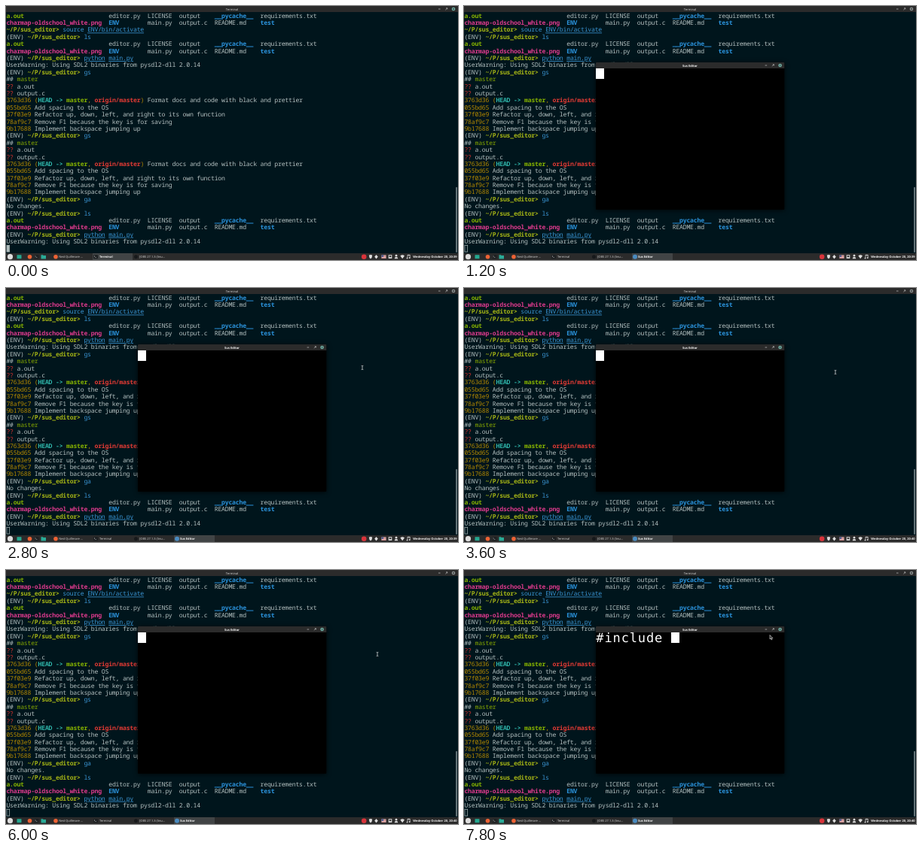
Write an HTML page that moves like this. It is 600 by 338 pixels and loops after 8000 ms.

```html
<!DOCTYPE html>
<html lang="en">
<head>
<meta charset="utf-8">
<title>Terminal and editor</title>
<style>
  html, body { margin: 0; width: 100%; height: 100%; overflow: hidden; background: #00151c; }
  svg { display: block; width: 100vw; height: 100vh; }
  text { white-space: pre; text-rendering: geometricPrecision; }
  #terminal { font: 8.2px "Noto Sans Mono", "DejaVu Sans Mono", monospace; letter-spacing: -.23px; fill: #b4c0c0; }
  .ui { font: 4px "Noto Sans", "Open Sans", sans-serif; fill: #d4d4d4; }
  .strong { font-weight: 600; fill: #f2f2f2; }
  .G, .B, .M, .P, .C, .R { font-weight: 700; }
  .G { fill: #86b300; }
  .B { fill: #2b93dc; }
  .M { fill: #dc3a8c; }
  .P { fill: #a5b416; }
  .C { fill: #2fb5aa; }
  .R { fill: #e03a34; }
  .g { fill: #86a800; }
  .r { fill: #dc322f; }
  .y { fill: #b58900; }
  .b { fill: #3a95d4; }
  .u { fill: #3a95d4; text-decoration: underline; }
  #typed { font: 17px "DejaVu Sans Mono", monospace; letter-spacing: .88px; fill: #fff; }
  #window { filter: drop-shadow(0 1px 3px #000b); }
</style>
</head>
<body>
<svg viewBox="0 0 600 338" preserveAspectRatio="none">
  <defs>
    <g id="controls" fill="none" stroke="#c4c4c4" stroke-width=".7">
      <path d="M-20 0h2.6M-10.6 1.2l2.4-2.4M-9.8-1.2h1.6v1.6"/>
      <circle r="2.3" fill="currentColor" stroke="none"/>
      <path d="M-.9-.9l1.8 1.8M.9-.9l-1.8 1.8" stroke="#262626"/>
    </g>
    <g id="shell">
      <rect x="-3" y="-2.5" width="6" height="5" rx=".6" fill="#1d2022"/>
      <path d="M-2-1.3l1 .8-1 .8M-.6.8h1.5" fill="none" stroke="#ddd" stroke-width=".5"/>
    </g>
  </defs>

  <rect width="600" height="338" fill="#00151c"/>
  <g id="terminal"></g>
  <rect id="block" x="1" y="318.3" width="3.7" height="8.8" stroke="#aebbbb" stroke-width=".7"/>
  <rect x="597.2" y="241" width="1.7" height="87" rx=".8" fill="#77858a"/>

  <rect width="600" height="8" fill="#2b2b2b"/>
  <text class="ui" x="300" y="5.5" text-anchor="middle">Terminal</text>
  <use id="mainControls" href="#controls" x="594" y="4"/>

  <g id="window">
    <rect x="175" y="75" width="250.3" height="196" rx="1" fill="#000"/>
    <path d="M175 83v-7q0-1 1-1h248.300q1 0 1 1v7z" fill="#2b2b2b"/>
    <rect id="hover" x="407" y="76.300" width="5.500" height="5.500" rx="1" fill="#555"/>
    <text class="ui strong" x="300" y="80.700" text-anchor="middle">Sus Editor</text>
    <use href="#controls" x="419.600" y="79" color="#72b5aa"/>
    <text id="typed" x="175.300" y="96"></text>
    <rect id="caret" y="83" width="11" height="14" fill="#fff"/>
  </g>

  <g class="ui">
    <rect y="329" width="600" height="9" fill="#2b2b2b"/>
    <rect id="activeTask" y="329" height="9" fill="#414445"/>
    <circle cx="5.500" cy="333.700" r="3.600" fill="#dedede"/>
    <rect x="14.500" y="331.200" width="6" height="5" rx=".5" fill="#25a891"/>
    <circle cx="31.500" cy="333.700" r="2.800" fill="#ee6335"/>
    <use href="#shell" x="40.500" y="333.700"/>
    <path d="M46.500 331.200h2.400l.7.800h3.400v4.500h-6.500z" fill="#2aab97"/>
    <circle cx="66" cy="333.700" r="2.800" fill="#ee6335"/>
    <text x="70.300" y="335.300">Ned Quillmore ...</text>
    <use href="#shell" x="119" y="333.700"/>
    <text id="shellTask" x="124" y="335.300">Terminal</text>
    <circle cx="172.500" cy="333.700" r="2.500" fill="#17191b"/>
    <text x="177" y="335.300">[OBS 27.1.3 (linu...</text>
    <g id="editorTask">
      <circle cx="227" cy="333.700" r="3" fill="#4a8bc0"/>
      <text class="strong" x="231" y="335.300">Sus Editor</text>
    </g>
    <circle cx="475.200" cy="333.700" r="3.300" fill="#d8343b"/>
    <g fill="#dedede">
      <path d="M481.800 331.600q2.200-.2 2.200-.8 0 .6 2.200.8 0 3.700-2.200 5-2.200-1.300-2.200-5z"/>
      <path d="M491.500 331l2.300 2.700-2.300 2.700-2.300-2.700z"/>
      <rect x="498.500" y="331.500" width="6" height="4.500"/>
      <path d="M498.500 332.300h6M498.500 333.800h6M498.500 335.300h6" stroke="#d25353" stroke-width=".7"/>
      <rect x="498.500" y="331.500" width="2.600" height="2.300" fill="#42538e"/>
      <path d="M507.700 331.300h4.600v4.800h-4.600zM508.700 332.300v2h2.600v-2z" fill-rule="evenodd"/>
      <circle cx="518" cy="332.200" r="1.400"/>
      <path d="M515.700 336.300q0-2.300 2.300-2.300t2.300 2.300z"/>
      <path d="M523.400 332.500q2.800-2.300 5.600 0l-2.800 3.800z"/>
      <path d="M533 335.500v-4.200h3.200v3.800M533 331.800h3.200" fill="none" stroke="#dedede" stroke-width=".7"/>
      <circle cx="532.500" cy="335.600" r=".9"/>
      <circle cx="535.700" cy="335.200" r=".9"/>
    </g>
    <text id="clock" class="strong" x="598.500" y="335.300" text-anchor="end"></text>
  </g>

  <g id="pointer">
    <path id="arrow" d="M0 0v5.500l1.300-1.100.9 2 .9-.4-.9-1.900h1.700z" fill="#222" stroke="#fff" stroke-width=".55"/>
    <path id="beam" d="M-1.300-2.600q1 0 1.300.5.300-.5 1.300-.5M0-2.100v4.200M-1.300 2.600q1 0 1.300-.5.300.5 1.300.5" fill="none" stroke="#e4e4e4" stroke-width=".75"/>
  </g>
</svg>
<script>
const $ = id => document.getElementById(id);
const LOOP = 8000, STEP = 200;

// Markup: {class:text}
const listing = [
  "{G:a.out}" + " ".repeat(24) + "editor.py  LICENSE  output    {B:__pycache__}  requirements.txt",
  "{M:charmap-oldschool_white.png}  {B:ENV}        main.py  output.c  README.md    {B:test}"
];
const prompt = command => `(ENV) {P:~/P/sus_editor>} ${command}`;
const run = [prompt("{u:python} {u:main.py}"), "UserWarning: Using SDL2 binaries from pysdl2-dll 2.0.14"];
const status = [
  prompt("{b:gs}"),
  "## {g:master}",
  "{r:??} a.out",
  "{r:??} output.c",
  "{y:3763d36 (}{C:HEAD -> }{G:master}{y:, }{R:origin/master}{y:)} Format docs and code with black and prettier",
  "{y:055bd65} Add spacing to the OS",
  "{y:37f03e9} Refactor up, down, left, and right to its own function",
  "{y:78af9c7} Remove F1 because the key is for saving",
  "{y:9b17688} Implement backspace jumping up"
];
const lines = [
  ...listing,
  "{P:~/P/sus_editor>} {b:source} {u:ENV/bin/activate}",
  prompt("{b:ls}"), ...listing, ...run,
  ...status, ...status,
  prompt("{b:ga}"), "No changes.",
  prompt("{b:ls}"), ...listing, ...run
];
const toMarkup = line => line
  .replace(/>/g, "&gt;")
  .replace(/\{(\w):([^}]*)\}/g, '<tspan class="$1">$2</tspan>');
$("terminal").innerHTML = lines
  .map((line, row) => `<text x=".4" y="${15.7 + row * 9.39}">${toMarkup(line)}</text>`)
  .join("");

// time, x, y
const path = [
  [1600, 390, 110], [2000, 407, 81], [2200, 407, 81], [2800, 473, 106],
  [3200, 493, 112], [6000, 493, 112], [6400, 406, 86.500], [8000, 406, 86.500]
];
function pointerAt(t) {
  const i = Math.max(1, path.findIndex(key => key[0] > t));
  const [t0, x0, y0] = path[i - 1], [t1, x1, y1] = path[i];
  const k = Math.max(0, (t - t0) / (t1 - t0));
  return [x0 + (x1 - x0) * k, y0 + (y1 - y0) * k];
}

const show = (id, on) => $(id).setAttribute("visibility", on ? "visible" : "hidden");
const set = (id, attributes) => {
  for (const name in attributes) $(id).setAttribute(name, attributes[name]);
};

function draw(t) {
  const open = t >= 400;
  show("window", open);
  show("editorTask", open);
  show("hover", t >= 2000 && t < 2400);
  set("block", { fill: open ? "none" : "#aebbbb" });
  set("mainControls", { color: open ? "#8c9292" : "#72b5aa" });
  set("activeTask", open ? { x: 223, width: 54 } : { x: 115, width: 53 });
  set("shellTask", { class: open ? "" : "strong" });

  const count = Math.min(9, Math.max(0, Math.round((t - 6400) / 1400 * 9)));
  $("typed").textContent = "#include ".slice(0, count);
  set("caret", { x: 175 + count * 11.11 });

  const [x, y] = pointerAt(t);
  const visible = t >= 1600, inWindow = x < 425;
  set("pointer", { transform: `translate(${x} ${y})` });
  show("arrow", visible && inWindow);
  show("beam", visible && !inWindow);
  $("clock").textContent = "Wednesday October 20, 20:" + (t < 3600 ? 39 : 40);
}

const start = performance.now();
let last = -1;
function tick() {
  const t = Math.floor((performance.now() - start) % LOOP / STEP) * STEP;
  if (t !== last) draw(last = t);
  requestAnimationFrame(tick);
}
tick();
</script>
</body>
</html>
```
